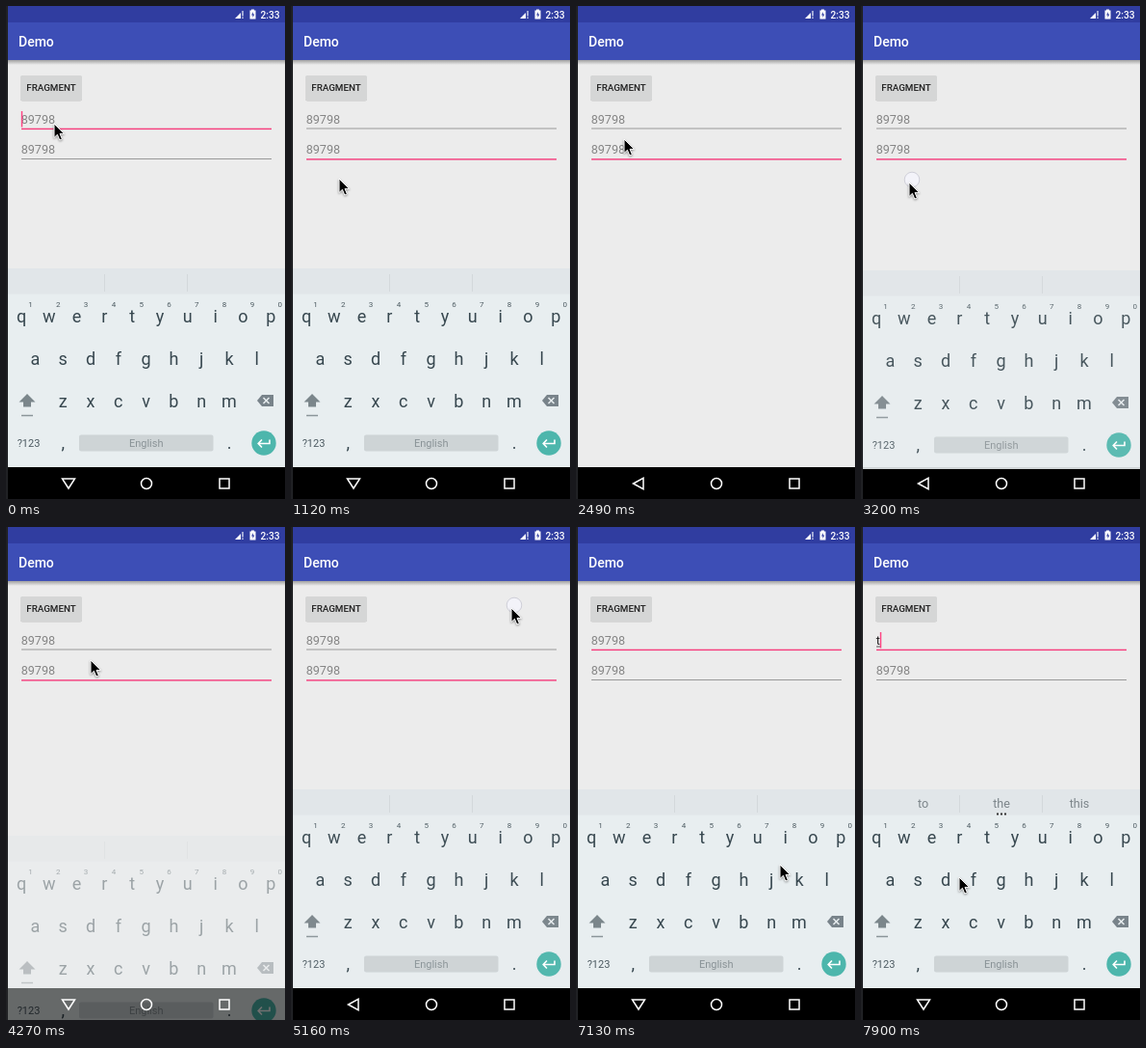
An HTML page for the animation above (8000 ms loop, 290 by 511 pixels).

```html
<!DOCTYPE html>
<html>
<head>
<meta charset="utf-8">
<style>
html, body { margin: 0; width: 100%; height: 100%; overflow: hidden; background: #ececec; }
svg { display: block; width: 290px; height: 511px; font-family: Roboto, sans-serif; }
.medium { font-weight: 500; }
.mid { text-anchor: middle; }
.hint { font-size: 12.6px; fill: #858585; }
.key { font-size: 18px; fill: #37474f; }
.small { font-size: 11px; fill: #4c5a61; }
.num { font-size: 8px; fill: #4c5a61; }
.nav { fill: none; stroke: #fff; stroke-width: 1.5; }
</style>
</head>
<body>
<svg viewBox="0 0 290 511">
  <defs>
    <linearGradient id="fade" x2="0" y2="1">
      <stop stop-color="#000" stop-opacity=".32"/>
      <stop offset="1" stop-color="#000" stop-opacity="0"/>
    </linearGradient>
  </defs>
  <rect width="290" height="511" fill="#ececec"/>
  <rect y="56" width="290" height="5" fill="url(#fade)"/>
  <rect width="290" height="17" fill="#303da0"/>
  <rect y="17" width="290" height="39" fill="#3d4eb6"/>
  <path d="M238 13L244 7V13Z" fill="#fff"/>
  <path d="M246 5V10.5M246 11.5V13" stroke="#dfe2f3" stroke-width="1.3"/>
  <path d="M253.5 4.5H255V3.5H258V4.5H259.5V13.5H253.5Z" fill="#fff"/>
  <path d="M257 6L255 9.5H256.5V12L258.3 8.5H256.8Z" fill="#303da0"/>
  <text class="medium" x="264.5" y="12.5" font-size="10.2" fill="#fff">2:33</text>
  <text class="medium" x="13" y="42" font-size="14" fill="#fff">Demo</text>

  <rect x="15" y="73" width="64" height="25.5" rx="2" fill="#000" opacity=".18"/>
  <rect x="15" y="72" width="64" height="26" rx="1.5" fill="#d5d6d6"/>
  <text class="medium mid" x="47" y="88.3" font-size="9.8" fill="#222">FRAGMENT</text>

  <text id="first" class="hint" x="15.7" y="121.5">89798</text>
  <text class="hint" x="15.7" y="153.3">89798</text>
  <rect id="compose" x="16" y="123.5" width="4" height="1" fill="#555"/>
  <rect id="line0" x="16" width="260"/>
  <rect id="line1" x="16" width="260"/>
  <rect id="caret" width="1.4" height="16.5" fill="#ff4081"/>

  <rect y="478" width="290" height="33" fill="#000"/>
  <g id="board">
    <rect y="272" width="290" height="206" fill="#e8eef0"/>
    <rect y="272" width="290" height="26.5" fill="#e1e6e9"/>
    <path d="M102.5 278V296M188.5 278V296" stroke="#d3d8db"/>
    <g id="words" class="mid" font-size="12.6" fill="#7c858a">
      <text x="64.5" y="291">to</text>
      <text x="146" y="291">the</text>
      <text x="227" y="291">this</text>
      <path d="M141 297.5H151" stroke="#333" stroke-width="2" stroke-dasharray="2 2"/>
    </g>
    <g id="keys"></g>
    <path d="M22 402L30.5 410.5H26V415.5H18V410.5H13.5Z" fill="#7b868b"/>
    <path d="M16 424.5H28" stroke="#8b9599" stroke-width="1.5"/>
    <path d="M261 409L266 403H278V415H266Z" fill="#78838a"/>
    <path d="M267.5 406L273.5 412M273.5 406L267.5 412" stroke="#e8eef0" stroke-width="1.5"/>
    <rect x="76" y="444.5" width="139.5" height="17" rx="2" fill="#ced4d6"/>
    <text class="mid" x="145.7" y="457" font-size="11" fill="#8a9397">English</text>
    <text class="small mid" x="23.5" y="457">?123</text>
    <circle cx="268" cy="453" r="12.7" fill="#4db6ac"/>
    <path d="M274 449.5V453.5H262.5M266 449.5L262.2 453.5L266 457.5" fill="none" stroke="#fff" stroke-width="1.6"/>
  </g>
  <path id="back" class="nav"/>
  <circle class="nav" cx="146" cy="495" r="5.5"/>
  <rect class="nav" x="222" y="490" width="10" height="10"/>
  <rect width="2" height="511" fill="#202124"/>
  <circle id="touch" r="7.8" fill="#f5f5fb" fill-opacity=".85" stroke="#cfcfd8"/>
  <path id="mouse" d="M0 0V14.5L3.4 11.3L5.8 17L8.4 15.9L6 10.4H10.6Z" stroke="#fff" stroke-width="1" style="filter:drop-shadow(0 1px 1px #0006)"/>
</svg>
<script>
const $ = id => document.getElementById(id);
const set = (id, attrs) => { for (const k in attrs) $(id).setAttribute(k, attrs[k]); };
const show = (id, on) => { $(id).style.display = on ? '' : 'none'; };
const clamp = u => Math.max(0, Math.min(1, u));

const label = (cls, x, y, s) => `<text class="${cls} mid" x="${x}" y="${y}">${s}</text>`;
const row = (s, x, y, cls = 'key') => [...s].map((c, i) => label(cls, x + i * 28.8, y, c)).join('');
$('keys').innerHTML = row('1234567890', 25.5, 311.5, 'num') + row('qwertyuiop', 16, 327.5) +
  row('asdfghjkl', 30.4, 371.5) + row('zxcvbnm', 59.2, 415.5) + row(',     .', 59.2, 459);

// The pointer reaches each stop shortly before its time, then may tap there.
const toSecond = 530, toFirst = 6160, typing = 7690;
const stops = [
  { at: 0, x: 50, y: 122 },
  { at: toSecond, x: 50, y: 137, tap: 'focus' },
  { at: 1150, x: 50, y: 179, tap: 'close' },
  { at: 1920, x: 57, y: 174 },
  { at: 2370, x: 50, y: 138, tap: 'open' },
  { at: 3186, x: 50, y: 183, tap: 'close' },
  { at: 4030, x: 88, y: 138, tap: 'open' },
  { at: 5155, x: 229, y: 84, tap: 'close' },
  { at: toFirst, x: 157, y: 118, tap: 'open' },
  { at: 7300, x: 212, y: 350 },
  { at: typing, x: 102, y: 363 }
];

function pointer(t) {
  let { x, y } = stops[0];
  for (const s of stops.slice(1)) {
    const u = clamp((t - s.at + 450) / 250), e = u * u * (3 - 2 * u);
    x += (s.x - x) * e;
    y += (s.y - y) * e;
  }
  return [x, y];
}

function keyboard(t) {
  const delay = s => s.tap === 'open' ? 150 : 0;
  const last = stops.filter(s => /open|close/.test(s.tap) && t >= s.at + delay(s)).pop();
  if (!last) return { open: true, alpha: 1, drop: 0 };
  const age = t - last.at - delay(last);
  if (last.tap === 'close') {
    const u = clamp(age / 150);
    return { open: false, alpha: 1 - u, drop: 22 * u };
  }
  const left = 1 - clamp(age / 300);
  return { open: true, alpha: 1 - left ** 1.6, drop: 100 * left ** 2 };
}

function underline(id, y, on) {
  set(id, { y: on ? y + .2 : y, height: on ? 1.4 : 1, fill: on ? '#f63c7c' : '#999' });
}

function draw() {
  const t = performance.now() % 8000;
  const second = t >= toSecond && t < toFirst, typed = t >= typing;

  underline('line0', 126.5, !second);
  underline('line1', 158, second);
  $('first').textContent = typed ? 't' : '89798';
  $('first').style.fill = typed ? '#222' : '';
  show('compose', typed);
  const since = [0, toSecond, toFirst, typing].filter(s => s <= t).pop();
  set('caret', { x: typed ? 19.8 : 15.8, y: second ? 140.5 : 109 });
  show('caret', (t - since) % 1000 < 500);

  const { open, alpha, drop } = keyboard(t);
  set('board', { opacity: alpha, transform: `translate(0 ${Math.floor(drop)})` });
  show('words', t >= typing + 90);
  set('back', { d: open ? 'M58.5 490H71.5L65 500Z' : 'M70 489.3V500.7L59.5 495Z' });

  const hit = stops.find(s => s.tap && t >= s.at && t < s.at + 110);
  show('touch', hit);
  if (hit) set('touch', { cx: hit.x + 3, cy: hit.y - 3 });
  set('mouse', { transform: `translate(${pointer(t)})` });
  requestAnimationFrame(draw);
}
draw();
</script>
</body>
</html>
```
